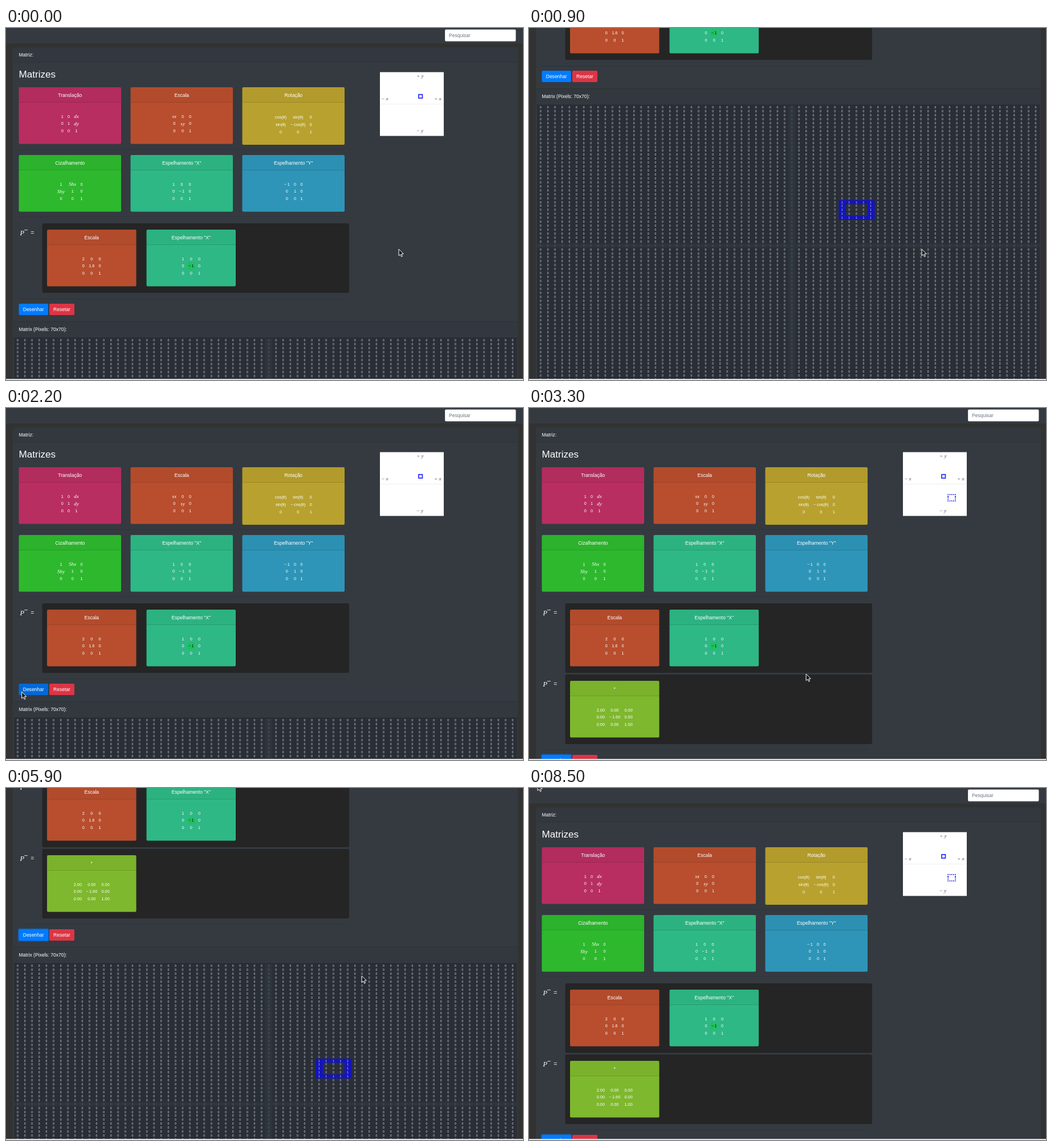
An HTML page with a canvas for the animation above (8.6 s loop, 907 px wide and 618 px high).

```html
<!DOCTYPE html>
<html lang="pt">
<head>
<meta charset="utf-8">
<style>
html, body { margin: 0; width: 100%; height: 100%; overflow: hidden; background: #323232; }
canvas { display: block; }
</style>
</head>
<body>
<canvas id="stage" width="907" height="618"></canvas>
<script>
const ctx = document.getElementById('stage').getContext('2d');
const LOOP = 8600, STEP = 100, CLICK_AT = 2100, RESULT_AT = 3300, RESULT_SHIFT = 125;
const HOVER_LAG = 200;
const SANS = '"Liberation Sans", Arial, sans-serif';
const SERIF = '"Liberation Serif", "Times New Roman", serif';
const SHADE = 'rgba(0,0,0,.03)', LINE = 'rgba(0,0,0,.125)';

// Moves: [arrival, travel time, ...place]; the value rests between moves
const scrollMoves = [
  [0, 0, 0], [900, 700, 408.8], [1477, 377, 0], [4600, 950, 401], [4800, 200, 520],
  [5900, 300, 361], [6400, 400, 70], [6700, 100, 0]
];
const pointerMoves = [
  [0, 0, 688.5, 388], [1400, 300, 664, 381], [2000, 600, 9, 506], [2400, 400, 45, 490],
  [3300, 100, 485.5, 466.7], [3500, 200, 150, 210], [4600, 200, 508.5, 228.7],
  [5000, 400, 584, 287], [5500, 400, 677, 476], [5900, 300, 623.5, 329.5],
  [6400, 400, 300, 220], [6700, 100, 150, 410], [7000, 100, 320, 410],
  [7200, 100, 308, 270], [7400, 100, 135, 138], [7600, 100, 37, 58],
  [8200, 100, 14, -14], [8400, 100, 14.5, -7.3]
];

const NEG = '−\u2009';
const mirrorX = [158, 'Espelhamento "X"', `1 0 0 0 ${NEG}1 0 0 0 1`];
const palette = [
  [338, 'Translação', '1 0 dx 0 1 dy 0 0 1'],
  [14, 'Escala', 'sx 0 0 0 sy 0 0 0 1'],
  [50, 'Rotação', `cos(θ) sin(θ) 0 sin(θ) ${NEG}cos(θ) 0 0 0 1`],
  [120, 'Cizalhamento', '1 Shx 0 Shy 1 0 0 0 1'],
  mirrorX,
  [195, 'Espelhamento "Y"', `${NEG}1 0 0 0 1 0 0 0 1`]
];
const factors = [[14, 'Escala', '2 0 0 0 1.6 0 0 0 1'], mirrorX];
const product = [85, '*', `2.00 0.00 0.00 0.00 ${NEG}1.60 0.00 0.00 0.00 1.00`];

// Outline of a 5 by 5 square, and its scaled and mirrored copy, as grid cells
const square = [], image = [];
for (let x = 7; x <= 11; x++) for (let y = 7; y <= 11; y++) {
  if (x % 4 != 3 && y % 4 != 3) continue;
  square.push([35 + x, 35 - y]);
  image.push([35 + 2 * x, 35 + Math.round(1.6 * y)]);
}

function place(moves, t) {
  let at = moves[0].slice(2);
  for (const [arrival, travel, ...to] of moves) {
    const p = travel ? Math.min(1, Math.max(0, (t - arrival + travel) / travel)) : 1;
    at = at.map((v, i) => v + (to[i] - v) * p);
  }
  return at;
}

function view(t) {
  const [x, y] = place(pointerMoves, t);
  return { x, y, scroll: Math.round(place(scrollMoves, t)[0]) };
}

function rect(x, y, w, h, color) {
  ctx.fillStyle = color;
  ctx.fillRect(x, y, w, h);
}

function box(x, y, w, h, r, color) {
  ctx.beginPath();
  ctx.roundRect(x, y, w, h, r);
  ctx.fillStyle = color;
  ctx.fill();
}

function setFont(size, face = SANS) {
  ctx.font = `${face == SERIF ? 'italic ' : ''}${size}px ${face}`;
}

function text(s, x, y, size = 8.53, color = '#fff', align = 'center', face = SANS) {
  setFont(size, face);
  ctx.textAlign = align;
  ctx.fillStyle = color;
  ctx.fillText(s, x, y + size * .35);
}

// Nine cells in columns as wide as their widest entry
function drawMatrix(entries, cx, y, rowHeight, color, marked) {
  const gap = 7.3;
  const cells = entries.split(' ').map(s => {
    const style = /^[dsS]h?[xy]$/.test(s) ? [9, SERIF] : [7.3, SANS];
    setFont(...style);
    return { s, style, width: ctx.measureText(s).width };
  });
  const widths = [0, 1, 2].map(c => Math.max(...cells.filter((_, i) => i % 3 == c).map(k => k.width)));
  const total = widths[0] + widths[1] + widths[2] + 2 * gap;
  cells.forEach(({ s, style: [size, face] }, i) => {
    const c = i % 3, row = Math.floor(i / 3);
    const before = widths.slice(0, c).reduce((sum, w) => sum + w + gap, 0);
    const px = cx - total / 2 + before + widths[c] / 2, py = y + row * rowHeight;
    const on = marked && i == 4;
    if (on) rect(px - 6, py - 5.5, 12, 11, 'rgba(20,200,70,.65)');
    text(s, px, py, size, on ? '#10200c' : color, 'center', face);
  });
  return total;
}

function drawCard([hue, title, entries], x, y, w, hover, marked) {
  const tall = entries.includes('('), h = tall ? 101 : 99.5;
  const cx = x + w / 2, cy = y + h / 2;
  const hovered = hover.x > x && hover.x < x + w && Math.abs(hover.y + hover.scroll - cy) < h / 2;
  ctx.save();
  if (hovered) {
    ctx.translate(cx, cy);
    ctx.scale(.9, .9);
    ctx.translate(-cx, -cy);
  }
  box(x, y, w, h, 2, `hsl(${hue} 60% 45%)`);
  rect(x, y, w, 27, 'rgba(0,0,0,.035)');
  rect(x, y + 26, w, 1, LINE);
  text(title, cx, y + 13.7);
  if (hovered) rect(cx - 32, y + 45, 64, 38, 'rgba(60,190,20,.25)');
  const total = drawMatrix(entries, cx, y + (tall ? 52 : 51.2), tall ? 13 : 12.6,
    hovered ? '#10200c' : '#fff', marked);
  ctx.restore();
  if (hovered) {
    const left = cx - total * .45;
    box(left, cy + 33, 34.5, 12.5, 2, '#d3f5d8');
    text('unknown', left + 17.2, cy + 39.3, 8.53, '#000');
  }
}

function drawProduct(y, cards, hover) {
  box(63.5, y, 538.5, 122, 3, '#252525');
  text('P', 24.5, y + 16.5, 12.5, '#fff', 'left', SERIF);
  for (const x of [32.3, 35.3]) rect(x, y + 11, 2.5, 1.2, '#ddd');
  text('=', 46.3, y + 16.5, 10.5);
  cards.forEach((c, i) => drawCard(c, 72 + 174.5 * i, y + 11, 156.5, hover, i == 1));
}

function drawPlot(points) {
  const x0 = 656, y0 = 77.5, unit = 1.6, size = 70 * unit, mid = size / 2;
  rect(x0, y0, size, size, '#fff');
  rect(x0, y0 + mid - .8, size, unit, '#f4f4f4');
  [['+ y', 14, -50], ['− x', -48, -10], ['+ x', 45, -10], ['− y', 13.5, 46]].forEach(([s, dx, dy]) => {
    for (const d of [0, .8])
      text(s, x0 + mid + dx + d, y0 + mid + dy + d, 9, 'rgba(90,90,90,.6)', 'center', SERIF);
  });
  for (const [c, r] of points)
    rect(x0 + c * unit, y0 + r * unit, unit + .1, unit + .1, '#1a1aff');
}

function drawTable(top, points) {
  const dx = 12.587, dy = 6.925, x0 = 20.5, y0 = top + 4.5, axis = '#2f353d';
  rect(14, top, 882.5, 70 * dy + 2, '#2a2f37');
  rect(14, top, 882.5, 1, '#23272d');
  rect(x0 + 34.5 * dx, top + 1, dx, 70 * dy, axis);
  rect(14, y0 + 34.5 * dy, 882.5, dy, axis);
  const blue = new Set(points.map(String));
  setFont(5);
  ctx.textAlign = 'center';
  for (let r = 0; r < 70; r++) for (let c = 0; c < 70; c++) {
    const x = x0 + c * dx, y = y0 + r * dy, on = blue.has(`${c},${r}`);
    if (on) rect(x - dx / 2 + .6, y - dy / 2, dx + .1, dy + .1, '#1414be');
    ctx.fillStyle = r == 35 || c == 35 ? 'rgba(255,255,255,.25)' : '#e4e5e6';
    ctx.fillText(on ? 1 : 0, x, y + 1.8);
  }
}

function drawButtons(y, hovered, focused) {
  if (focused) box(21, y - 1.5, 54.5, 23, 3, 'rgba(0,123,255,.5)');
  box(22.5, y, 51.5, 20, 2, hovered ? '#0069d9' : '#007bff');
  box(76, y, 44, 20, 2, '#dc3545');
  text('Desenhar', 48.2, y + 9.7);
  text('Resetar', 98, y + 9.7);
}

function drawHeader(y, h, label) {
  rect(12, y, 886, h, SHADE);
  rect(12, y + h, 886, 1, LINE);
  text(label, 22.5, y + h / 2, 8.53, '#fff', 'left');
}

function drawPointer(x, y) {
  const tip = new Path2D('M.6.3v11.5l2.7-2.3 1.9 4 1.8-.8-1.8-3.9 3.6-.3z');
  ctx.save();
  ctx.translate(x, y);
  ctx.fillStyle = '#16181b';
  ctx.strokeStyle = '#fff';
  ctx.lineWidth = 1;
  ctx.fill(tip);
  ctx.stroke(tip);
  ctx.restore();
}

function draw(t) {
  const now = view(t), hover = view(t - HOVER_LAG);
  const done = t >= RESULT_AT, shift = done ? RESULT_SHIFT : 0;
  const points = done ? square.concat(image) : square;

  rect(0, 0, 907, 618, '#323232');
  ctx.save();
  ctx.translate(0, -now.scroll);
  rect(0, 0, 907, 27, '#343a40');
  box(770, 2.5, 124.5, 21, 2, '#ced4da');
  box(770.5, 3, 123.5, 20, 2, '#fff');
  text('Pesquisar', 777, 13.3, 8.53, '#6c757d', 'left');

  box(12, 34, 886, 1003 + shift, 2, '#343a40');
  drawHeader(34, 25.5, 'Matriz:');
  text('Matrizes', 22.5, 81, 17.1, '#fff', 'left');
  for (const y of [213, 331, 475 + shift]) rect(22.5, y, 571.5, 1, 'rgba(0,0,0,.1)');

  palette.forEach((c, i) => drawCard(c, 22.5 + 196 * (i % 3), 104 + 119 * Math.floor(i / 3), 179.5, hover));
  drawProduct(343, factors, hover);
  if (done) drawProduct(343 + shift, [product], hover);
  drawPlot(points);

  drawButtons(484 + shift, t >= CLICK_AT && !done, done);
  rect(12, 515 + shift, 886, 1, LINE);
  drawHeader(515 + shift, 28.5, 'Matrix (Pixels: 70x70):');
  drawTable(544 + shift, points);
  ctx.restore();

  rect(0, 616, 907, 2, '#d5dcea');
  drawPointer(now.x, now.y);
}

let shown = -1;
const start = performance.now();
function tick() {
  const t = Math.floor((performance.now() - start) % LOOP / STEP) * STEP;
  if (t != shown) draw(shown = t);
  requestAnimationFrame(tick);
}
tick();
</script>
</body>
</html>
```
